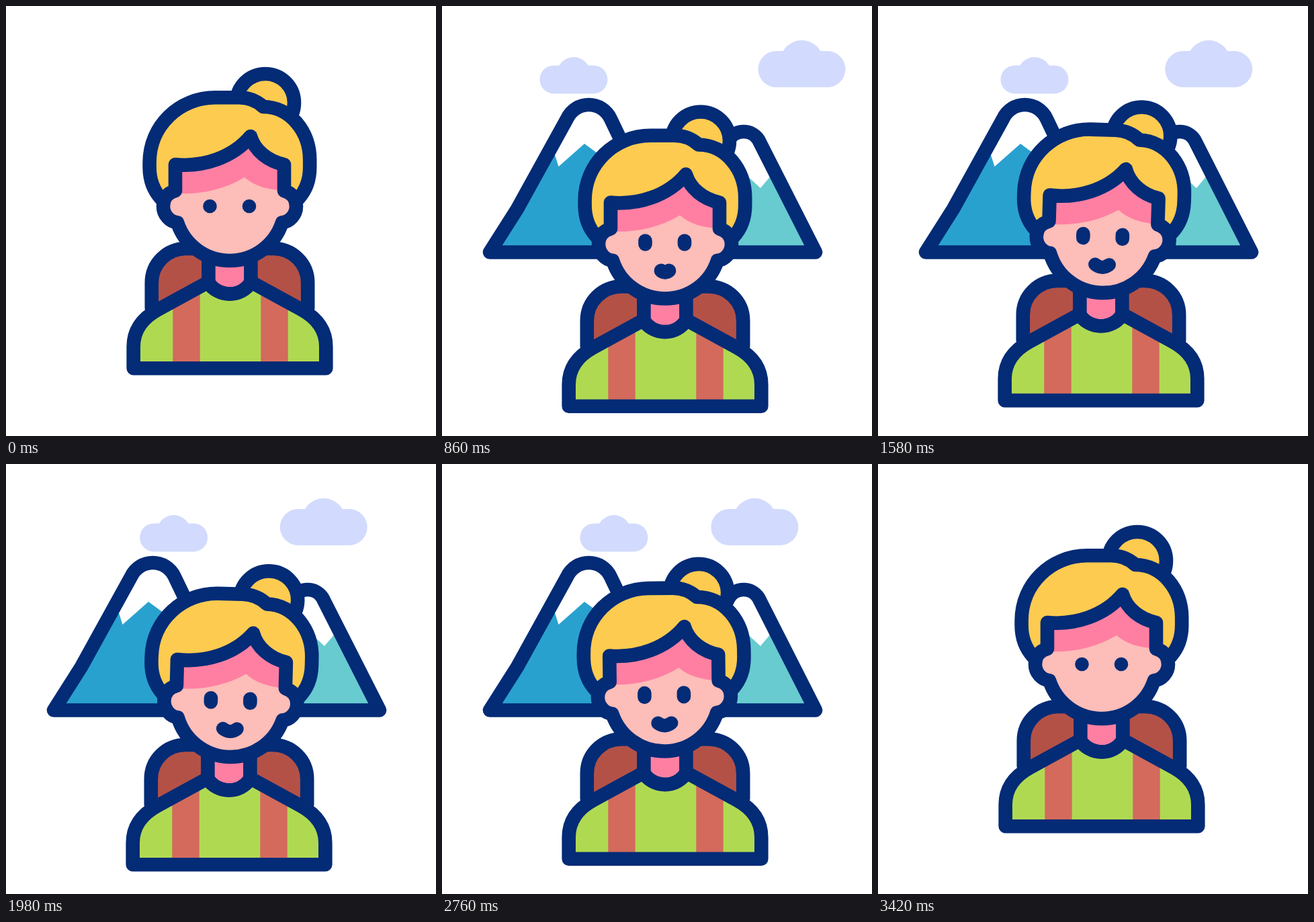
Animation of 640x640 px, one loop 3600 ms. Source, as an HTML page with a canvas:

```html
<!DOCTYPE html>
<html lang="en">
<head>
<meta charset="utf-8">
<title>Hiker</title>
<style>
html, body { margin: 0; width: 100%; height: 100%; overflow: hidden; background: #fff; }
canvas { display: block; width: 100%; height: 100%; }
</style>
</head>
<body>
<canvas id="stage" width="640" height="640"></canvas>
<script>
const ctx = document.getElementById('stage').getContext('2d');
const LOOP = 3600;
const C = {
  navy: '#032b76', hair: '#fdcb50', skin: '#fdbdb8', pink: '#ff7fa2', green: '#b0d952',
  strap: '#d36a5c', pack: '#b35147', blue: '#29a1cf', teal: '#67cbd0', cloud: '#d2dbfd'
};

const shape = {
  pack: new Path2D('M216.8 450V412C216.8 383 240 361 268 361H398C426 361 449.2 383 449.2 412V450'),
  neck: new Path2D('M301.4 375V411C307 422 320 428.6 333 428.6C346 428.6 358 422 364.4 411V375'),
  body: new Path2D('M189.7 539.3V507C189.7 482 204 464 226 452L301 411C307 422 320 428.6 333 428.6' +
    'C346 428.6 358 422 365 411L440 452C462 464 476.3 482 476.3 507V539.3Z'),
  bun: new Path2D('M429 144A43 43 0 1 0 343 144A43 43 0 1 0 429 144Z'),
  hair: new Path2D('M231 287C220 275 213.6 259 213.6 240V233C213.6 178 258 136.3 311 136.3H347' +
    'C362 136.3 373 141 383 150C423 150 452.2 187 452.2 229V240C452.2 259 446 275 435 287'),
  face: new Path2D('M252 236V275C240 278 234 287 234 298C234 311 244 321.5 255 322.3' +
    'A82 82 0 0 0 411 322.3C422 321.5 432 311 432 298C432 287 425 278 414 275V236' +
    'C390 231 370 215 364 194C337 226 293 240 252 236Z'),
  shade: new Path2D('M252 180H414V275C388 273 370 268 355 255C325 273 290 281 252 279Z'),
  peakL: new Path2D('M71 366.5L112 302L186 168C199 140 238 140 251 168L346 366.5Z'),
  rockL: new Path2D('M60 370L165 212L173.5 239L212 205L246 230L264 203L360 370Z'),
  peakR: new Path2D('M342 366.5L427 199C437 183 461 183 471 199L556 366.5Z'),
  rockR: new Path2D('M330 370L408 255L424 271L449 248L474 271L490 252L570 370Z')
};

const clamp = v => Math.max(0, Math.min(1, v));
const span = (t, a, b) => clamp((t - a) / (b - a));
const sine = p => (1 - Math.cos(Math.PI * p)) / 2;
const ease = (t, a, b) => sine(span(t, a, b));

// Keys are [time, value] pairs joined with sine easing.
function track(t, keys) {
  let v = keys[0][1];
  for (let i = 1; i < keys.length; i++) {
    v += (keys[i][1] - keys[i - 1][1]) * ease(t, keys[i - 1][0], keys[i][0]);
  }
  return v;
}

const BOB = [[180, 0], [500, 46], [520, 46], [940, 57.5], [1350, 46], [1460, 46],
  [1920, 57.5], [2370, 46], [2620, 46], [2840, 49.5]];
const TILT = [[1000, 0], [1770, 2], [2550, -1.2], [3000, 0]];

function fill(path, color) {
  ctx.fillStyle = color;
  ctx.fill(path);
}

function outline(path) {
  ctx.strokeStyle = C.navy;
  ctx.lineWidth = 20.6;
  ctx.stroke(path);
}

function inside(path, draw) {
  ctx.save();
  ctx.clip(path);
  draw();
  ctx.restore();
}

function cloud(x, top, s) {
  ctx.save();
  ctx.translate(x, top);
  ctx.scale(s, s);
  ctx.fillStyle = C.cloud;
  ctx.beginPath();
  ctx.roundRect(-65, 16, 130, 54, 27);
  ctx.fill();
  ctx.beginPath();
  ctx.arc(0, 32, 32, 0, 7);
  ctx.fill();
  ctx.restore();
}

function mountain(peak, rock, color) {
  fill(peak, '#fff');
  inside(peak, () => fill(rock, color));
  outline(peak);
}

function scenery(t) {
  if (t < 180 || t >= 3400) return;
  const away = (1 - span(t, 180, 440)) ** 2 + span(t, 2860, 3400) ** 2;
  const drift = ease(t, 180, 2420) - ease(t, 2620, 4860);
  ctx.save();
  ctx.translate(-613 * away, 29 * away);
  cloud(179.7 + 77 * drift, 76, 0.777);
  cloud(554.5 - 90 * drift, 51, 1);
  mountain(shape.peakR, shape.rockR, C.teal);
  mountain(shape.peakL, shape.rockL, C.blue);
  ctx.restore();
}

function torso() {
  fill(shape.pack, C.pack);
  outline(shape.pack);
  fill(shape.neck, C.pink);
  outline(shape.neck);
  fill(shape.body, C.green);
  inside(shape.body, () => {
    ctx.fillStyle = C.strap;
    ctx.fillRect(248.3, 400, 40.4, 140);
    ctx.fillRect(379.3, 400, 40.4, 140);
  });
  outline(shape.body);
}

function mouth(t) {
  const alpha = span(t, 540, 720) - span(t, 2900, 3220);
  if (alpha <= 0) return;
  const open = ease(t, 700, 1000) - ease(t, 2720, 3020);
  const w = 0.3 + 10.2 * open;
  const y = 338 - open;
  ctx.save();
  ctx.globalAlpha = alpha;
  ctx.strokeStyle = C.navy;
  ctx.lineWidth = 22 - 2 * open;
  ctx.beginPath();
  ctx.moveTo(333 - w, y);
  ctx.quadraticCurveTo(333, y + 8 * open, 333 + w, y);
  ctx.stroke();
  ctx.restore();
}

function head(t) {
  fill(shape.bun, C.hair);
  outline(shape.bun);
  fill(shape.hair, C.hair);
  outline(shape.hair);
  fill(shape.face, C.skin);
  inside(shape.face, () => fill(shape.shade, C.pink));
  outline(shape.face);
  const tall = 20.6 + 6 * (ease(t, 640, 940) - ease(t, 2720, 3020));
  ctx.fillStyle = C.navy;
  for (const x of [303.5, 362]) {
    ctx.beginPath();
    ctx.roundRect(x - 10.3, 308.3 - tall, 20.6, tall, 10.3);
    ctx.fill();
  }
  mouth(t);
}

function person(t) {
  const leave = sine(span(t, 2840, 3420) ** 0.7);
  const y = track(t, BOB) * (1 - leave);
  ctx.save();
  ctx.translate(-Math.min(1, y / 46), y);
  torso();
  ctx.translate(333, 390);
  ctx.rotate(track(t, TILT) * Math.PI / 180);
  ctx.translate(-333, -390);
  head(t);
  ctx.restore();
}

function frame(now) {
  const t = now % LOOP;
  ctx.fillStyle = '#fff';
  ctx.fillRect(0, 0, 640, 640);
  ctx.lineCap = ctx.lineJoin = 'round';
  scenery(t);
  person(t);
}

const start = performance.now();
function tick() {
  frame(performance.now() - start);
  requestAnimationFrame(tick);
}
tick();
</script>
</body>
</html>
```
